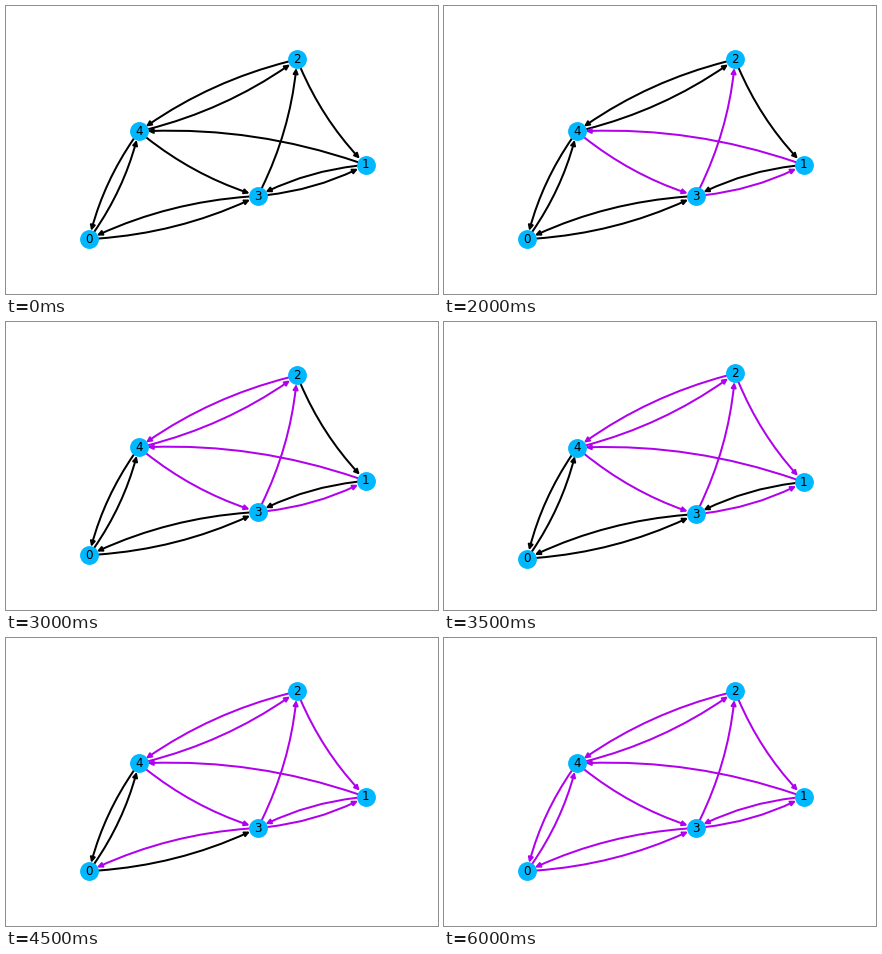
A matplotlib script for the animation above (6.5 s loop, 432 by 288 pixels).

```python
import matplotlib.pyplot as plt
import numpy as np
from matplotlib.animation import FuncAnimation
from matplotlib.patches import FancyArrowPatch

NODE_COLOR = "#00b8ff"
WALKED_COLOR = "#b000ee"
NODE_SIZE = 300
PAD = 0.05

POS = np.array([(0, 0), (1, 0.413), (0.7518, 1), (0.61, 0.24), (0.18, 0.599)])

# Edges in the order in which the circuit walks them.
CIRCUIT = [(3, 1), (1, 4), (4, 3), (3, 2), (2, 4), (4, 2),
           (2, 1), (1, 3), (3, 0), (0, 4), (4, 0), (0, 3)]

fig = plt.figure(figsize=(6, 4), dpi=72, facecolor="white")
ax = fig.add_axes([0.125, 0.125, 0.775, 0.755])


def padded_corners(edges):
    """Bounding box of the edges' end points, grown by PAD on each side."""
    ends = POS[np.ravel(edges)]
    low, high = ends.min(axis=0), ends.max(axis=0)
    pad = PAD * (high - low)
    return [low - pad, high + pad]


def fit_view(groups):
    """Scale the axes to the padded boxes of all edge groups plus a margin."""
    corners = np.vstack([POS] + [padded_corners(g) for g in groups if g])
    low, high = corners.min(axis=0), corners.max(axis=0)
    margin = PAD * (high - low)
    (x0, y0), (x1, y1) = low - margin, high + margin
    ax.set_xlim(x0, x1)
    ax.set_ylim(y0, y1)


def draw_edges(edges, color):
    shrink = np.sqrt(NODE_SIZE) / 2
    for start, end in edges:
        ax.add_patch(FancyArrowPatch(
            POS[start], POS[end], arrowstyle="-|>", mutation_scale=10,
            connectionstyle="arc3,rad=0.1", shrinkA=shrink, shrinkB=shrink,
            color=color, linewidth=2, zorder=1))


def draw_nodes():
    ax.scatter(POS[:, 0], POS[:, 1], s=NODE_SIZE, c=NODE_COLOR,
               linewidths=1.5, zorder=2)
    for i, (x, y) in enumerate(POS):
        ax.text(x, y, str(i), fontsize=12, family="DejaVu Sans",
                color="black", ha="center", va="center", zorder=3)


def draw(step):
    walked, remaining = CIRCUIT[:step], CIRCUIT[step:]
    ax.clear()
    ax.axis("off")
    draw_edges(remaining, "black")
    draw_edges(walked, WALKED_COLOR)
    draw_nodes()
    fit_view([walked, remaining])
    return []


anim = FuncAnimation(fig, draw, frames=len(CIRCUIT) + 1, interval=500,
                     init_func=lambda: [], repeat=True, repeat_delay=0)
plt.show()
```
